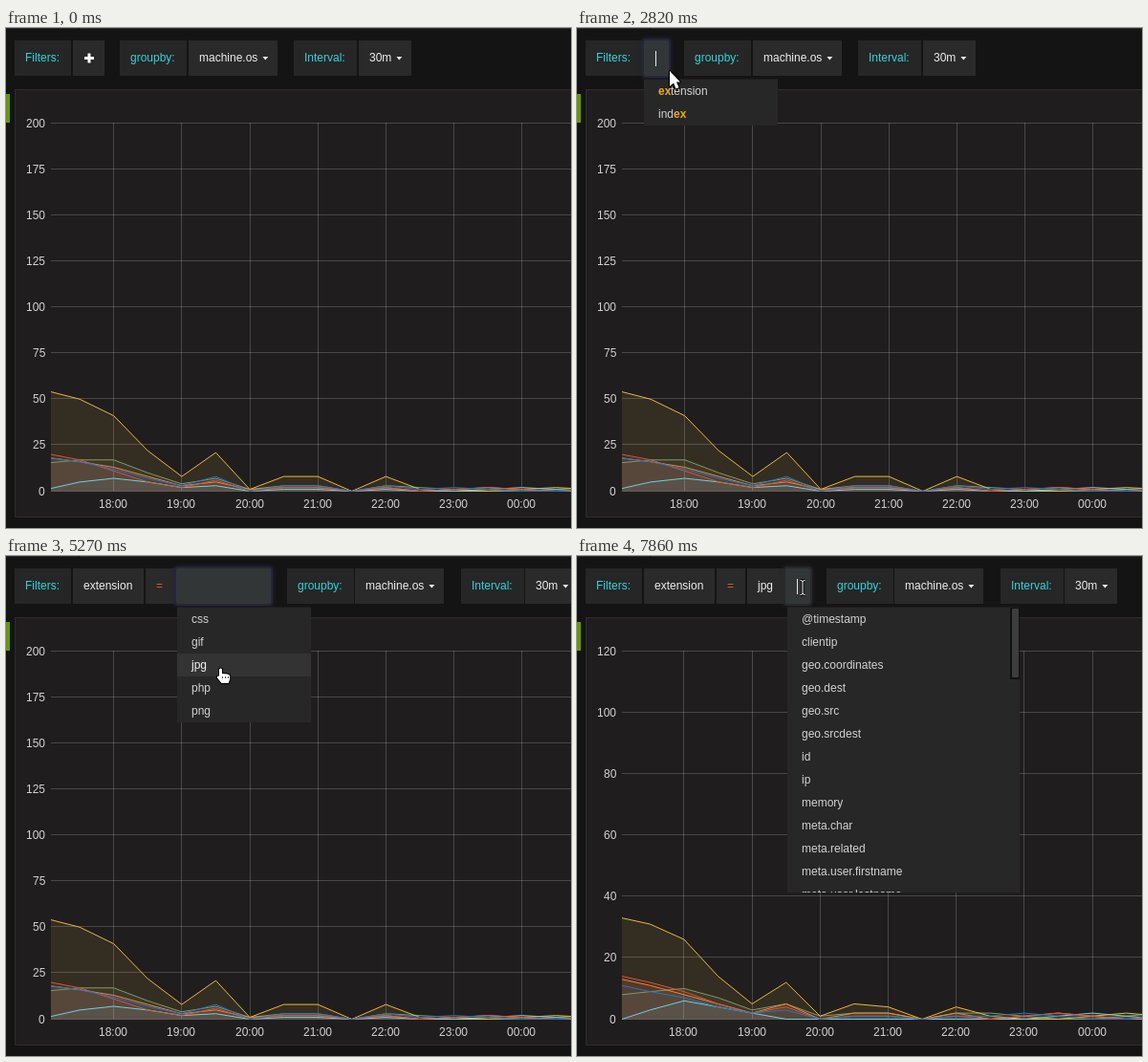
Recreate the animation shown at these times as an HTML page with a canvas. Size 591 by 523 pixels, loop 8 s.

```html
<!DOCTYPE html>
<html lang="en">
<head>
<meta charset="utf-8">
<title>Dashboard filters</title>
<style>
html, body { margin: 0; width: 100%; height: 100%; overflow: hidden; background: #141414; }
canvas { display: block; }
</style>
</head>
<body>
<canvas id="stage" width="591" height="523"></canvas>
<script>
const c = document.getElementById('stage').getContext('2d');
const LOOP = 8000;
const FONT = '12px "Liberation Sans", Arial, sans-serif';
const BOLD = 'bold ' + FONT;
const CYAN = '#31d2dc', PALE = '#eeeeee', SOFT = '#d2d2d2';
const GRID = 'rgba(210,205,205,.24)';
const FLOOR = 484, HEIGHT = 385, STEP = 35.585, POINTS = 17;

const clamp = v => Math.max(0, Math.min(1, v));
const lerp = (a, b, k) => a + (b - a) * k;

function rect(x, y, w, h, color) {
  c.fillStyle = color;
  c.fillRect(x, y, w, h);
}

function round(x, y, w, h, r, color) {
  c.fillStyle = color;
  c.beginPath();
  c.roundRect(x, y, w, h, r);
  c.fill();
}

function measure(s, font = FONT) {
  c.font = font;
  return c.measureText(s).width;
}

// align: 0 left, 0.5 centre, 1 right
function text(s, x, y, color = SOFT, align = 0, font = FONT) {
  const w = measure(s, font);
  c.fillStyle = color;
  c.fillText(s, Math.round(x - w * align), y);
  return w;
}

// ---- Chart ----

const SERIES = [
  { name: 'zt', color: '#7e9a68' },
  { name: 'lum', color: '#eab839' },
  { name: 'orn', color: '#6ed0e0' },
  { name: 'elo', color: '#ef843c' },
  { name: '8', color: '#d9533f' },
  { name: '7', color: '#1f78c1' }
];

// A falling shoulder, a hump at 19:30, echoes of it until 22:00, then a ripple.
function curve([edge, top, fall, hump], s) {
  return Array.from({ length: POINTS }, (_, i) => {
    let v = lerp(edge, top, clamp(i / 2)) / (1 + (i / fall) ** 5);
    if (i === 5) v += hump;
    else if (i > 10) v += 0.8 + 0.8 * Math.sin(s + i * 1.3);
    else if (i > 5) v += 0.55 * hump * Math.cos((i - 7.5) * Math.PI / 3) ** 2;
    return Math.max(0, i ? Math.round(v) : v);
  });
}

// Each shape: edge, top, fall, hump.
const ALL = {
  top: 200, tick: 25, x0: 77.1, cross: '#626060',
  rows: [[15.5, 19, 3, 6], [54, 47, 2.9, 18], [1.5, 8, 3.4, 2],
    [18, 14, 3.2, 4], [20, 14, 2.7, 5], [18, 14, 3, 7]].map(curve)
};
const JPG = {
  top: 120, tick: 20, x0: 76.4, cross: '#9c3a2c',
  rows: [[8, 11, 3.3, 4], [33, 30, 2.95, 10], [0, 6, 3.4, -1],
    [13, 9, 3.2, 4], [14, 11, 2.8, 3], [11, 8, 3, 2]].map(curve)
};

const px = (set, i) => i ? set.x0 + (i - 1) * STEP : 47;
const py = (set, v) => FLOOR - v * HEIGHT / set.top;
const indexAt = (set, x) => Math.max(1, Math.floor((x - set.x0) / STEP) + 1);
const clock = half => String(Math.floor(half / 2) % 24).padStart(2, '0') + (half % 2 ? ':30' : ':00');

function trace(set, row) {
  c.beginPath();
  row.forEach((v, i) => c.lineTo(px(set, i), py(set, v) + 0.5));
}

function drawChart(set) {
  c.globalAlpha = 0.1;
  set.rows.forEach((row, s) => {
    trace(set, row);
    c.lineTo(px(set, POINTS - 1), FLOOR + 0.5);
    c.lineTo(47, FLOOR + 0.5);
    c.fillStyle = SERIES[s].color;
    c.fill();
  });
  c.globalAlpha = 1;
  for (let v = 0; v <= set.top; v += set.tick) {
    const y = Math.floor(py(set, v));
    rect(47, y, 544, 1, GRID);
    text(v, 41, y + 5, SOFT, 1);
  }
  for (let i = 2; i < POINTS - 2; i += 2) {
    const x = Math.floor(px(set, i));
    rect(x, 99, 1, HEIGHT, GRID);
    text(clock(34 + i), x + 0.5, 502, SOFT, 0.5);
  }
  c.lineWidth = 1;
  set.rows.forEach((row, s) => {
    trace(set, row);
    c.strokeStyle = SERIES[s].color;
    c.stroke();
  });
}

function drawHover(set, m) {
  const i = indexAt(set, m.x);
  rect(Math.round(m.x) - 1, 99, 1, HEIGHT, set.cross);
  c.lineWidth = 3;
  c.globalAlpha = 0.55;
  set.rows.forEach((row, s) => {
    c.strokeStyle = SERIES[s].color;
    c.beginPath();
    c.arc(px(set, i), py(set, row[i]), 4.5, 0, 7);
    c.stroke();
  });
  c.globalAlpha = 1;
}

function drawTip(set, m) {
  const i = indexAt(set, m.x);
  const x = Math.round(m.x) + 28, y = Math.round(m.y) + 28;
  round(x, y, 137, 148, 4, '#333333');
  text(`2016-09-20 ${clock(34 + i)}:00`, x + 12, y + 21);
  SERIES.forEach(({ name, color }, s) => {
    const ty = y + 43 + s * 18;
    round(x + 12, ty - 6, 10, 3, 1, color);
    text(name + ':', x + 25, ty);
    text(set.rows[s][i], x + 78, ty, '#e2e2e2', 1, BOLD);
  });
}

function drawPage() {
  rect(0, 0, 591, 523, '#141414');
  rect(0, 0, 76, 1, '#2a2a2a');
  rect(77, 0, 514, 1, '#303030');
  rect(9, 64, 590, 448, '#2d2b2b');
  rect(10, 65, 590, 446, '#1f1d1e');
  rect(0, 69, 4, 30, '#669900');
}

// ---- Toolbar ----

const PAD = 24.7, GAP = 15.3;
const label = s => ({ kind: 'label', s, color: CYAN, back: '#262626' });
const value = (s, end = false) => ({ kind: 'value', s, color: PALE, back: '#2a2a2a', end });
const menu = s => ({ ...value(s, true), kind: 'menu' });
const input = w => ({ kind: 'input', w, end: true });
const PLUS = { kind: 'plus', w: 34.3, back: '#2a2a2a', end: true };
const SMALL = input(27.3), WIDE = input(100.9);
const TAG = [value('extension'), { ...value('='), color: '#c4632f' }];
const TAIL = [label('groupby:'), menu('machine.os'), label('Interval:'), menu('30m')];

const STATES = [
  [0, [PLUS]],
  [1920, [SMALL]],
  [3520, [...TAG, value('select tag value', true)]],
  [4400, [...TAG, WIDE]],
  [6060, [...TAG, value('jpg'), PLUS]],
  [7620, [...TAG, value('jpg'), SMALL]]
];

function drawInput(x, w, age) {
  const blue = clamp((age - 240) / 400);
  const ring = `rgb(${lerp(40, 37, blue)},${lerp(40, 37, blue)},${lerp(42, 60, blue)})`;
  c.save();
  c.shadowColor = ring;
  c.shadowBlur = 5;
  round(x - 2, 11, w + 4, 41, 4, ring);
  c.restore();
  round(x, 13, w, 37, 2, '#333637');
  if (w < 40) rect(x + 12, 24, 1, 16, '#e8e8e8');
}

function drawBar(t) {
  const [start, parts] = STATES.filter(s => t >= s[0]).pop();
  let x = 9.1;
  for (const part of [label('Filters:'), ...parts, ...TAIL]) {
    const left = Math.round(x);
    const full = part.w || measure(part.s) + PAD + (part.kind === 'menu' ? 9 : 0);
    const w = Math.round(full - 1.6);
    if (part.kind === 'input') drawInput(left, w, t - start);
    else rect(left, 13, w, 37, part.back);
    if (part.kind === 'plus') {
      round(left + 12, 30, 10, 3, 0.5, '#ffffff');
      round(left + 15.5, 26.5, 3, 10, 0.5, '#ffffff');
    }
    if (part.s) {
      const end = left + 16 + text(part.s, left + 11, 35, part.color);
      if (part.kind === 'menu') {
        c.beginPath();
        c.moveTo(end, 30);
        c.lineTo(end + 6, 30);
        c.lineTo(end + 3, 33.4);
        c.fill();
      }
    }
    x += full + (part.end ? GAP : 0);
  }
}

// ---- Suggestions ----

const FIELDS = ['@timestamp', 'clientip', 'geo.coordinates', 'geo.dest', 'geo.src', 'geo.srcdest',
  'id', 'ip', 'memory', 'meta.char', 'meta.related', 'meta.user.firstname', 'meta.user.lastname'];
const TYPES = ['css', 'gif', 'jpg', 'php', 'png'];

function drawList(x, w, items, m, mark = '') {
  const h = Math.min(298, items.length * 24);
  c.save();
  c.beginPath();
  c.rect(x, 53, w, h + 1);
  c.clip();
  rect(x, 53, w, h + 1, '#1d1d1d');
  rect(x, 54, w, h, '#272727');
  items.forEach((item, i) => {
    const y = 54 + i * 24;
    const hot = m.x > x && m.x < x + w && m.y >= y && m.y < y + 24;
    if (hot) rect(x, y, w, 24, '#333333');
    const color = hot ? '#f4f4f4' : SOFT;
    const at = mark ? item.indexOf(mark) : 0;
    let tx = x + 15;
    tx += text(item.slice(0, at), tx, y + 16, color);
    tx += text(mark, tx, y + 16, '#eea820', 0, BOLD);
    text(item.slice(at + mark.length), tx, y + 16, color);
  });
  if (h < items.length * 24) {
    rect(x + w - 10, 54, 10, 75, '#111111');
    round(x + w - 8, 55, 7, 72, 1, '#3d3d3d');
  }
  c.restore();
}

function drawLists(t, m) {
  if (t >= 7660) drawList(220, 243, FIELDS, m);
  else if (t >= 6060) return;
  else if (t >= 4440) drawList(179, 140, TYPES, m);
  else if (t >= 3520) return;
  else if (t >= 2900) drawList(70, 140, ['extension'], m, 'ext');
  else if (t >= 2410) drawList(70, 140, ['extension', 'index'], m, 'ex');
  else if (t >= 1960) drawList(70, 243, FIELDS, m);
}

// ---- Pointer ----

// Each move: start, end, x, y.
const MOVES = [
  [420, 780, 228, 108], [780, 1220, 102, 37], [1220, 1340, 82, 27],
  [2660, 2820, 97, 45], [2820, 3100, 128, 80], [3270, 3350, 128, 64], [3870, 4020, 194, 28],
  [4790, 5270, 224, 117], [5270, 5520, 224, 128], [5600, 5720, 199, 111],
  [6090, 6380, 271, 72], [6380, 6460, 243, 66], [6460, 6860, 236, 29]
];

function pointerAt(t) {
  let x = 222, y = 215;
  for (const [from, to, tx, ty] of MOVES) {
    const k = clamp((t - from) / (to - from));
    x = lerp(x, tx, k);
    y = lerp(y, ty, k);
  }
  return { x, y };
}

const HAND = new Path2D('M-1 8.5V2a1.5 1.5 0 0 1 3 0V6l5 .6q3.2.4 3.2 2.4v3l-1.6 4H1.5L-3 10.5q-.8-1.6.8-2z');
const ARROW = new Path2D('M0 0V16L4 12.4L6.5 18.5L9.5 17.3L7 11.4H11Z');
const BEAM = new Path2D('M-2.5-3.5Q0-3.5 0-2V10Q0 11.5-2.5 11.5M2.5-3.5Q0-3.5 0-2M0 10Q0 11.5 2.5 11.5');
const CROSS = new Path2D('M-9-1h6v2h-6zM3-1h6v2h-6zM-1-9h2v6h-2zM-1 3h2v6h-2z');

function shapeAt(t, m) {
  if (t < 1220 && m.y > 64) return CROSS;
  if (t >= 2690 && t < 3080) return ARROW;
  const focus = (t >= 1920 && t < 2690) || (t >= 4400 && t < 6060) || t >= 7620;
  return focus && m.y < 50 ? BEAM : HAND;
}

function drawPointer(t, m) {
  if (t < 420) return;
  const shape = shapeAt(t, m);
  c.save();
  c.translate(Math.round(m.x), Math.round(m.y));
  c.lineJoin = 'round';
  c.strokeStyle = '#000';
  c.lineWidth = shape === BEAM ? 3 : 2;
  c.stroke(shape);
  c.strokeStyle = c.fillStyle = '#fff';
  c.lineWidth = 1;
  if (shape === BEAM) c.stroke(shape);
  else c.fill(shape);
  if (shape === HAND) for (let x = 2; x < 9; x += 3) rect(x, 9, 1, 2, '#555');
  c.restore();
}

function draw(t) {
  const m = pointerAt(t);
  const set = t < 6140 ? ALL : JPG;
  const second = t >= 6180 && t < 6860;
  const over = second ? pointerAt(t + 80) : m;
  const hover = (second || (t >= 420 && t < 1220)) && over.y > 65;
  drawPage();
  drawChart(set);
  if (hover) drawHover(set, over);
  drawBar(t);
  drawLists(t, m);
  if (hover) drawTip(set, over);
  drawPointer(t, m);
}

const begin = performance.now();
function tick() {
  draw((performance.now() - begin) % LOOP);
  requestAnimationFrame(tick);
}
tick();
</script>
</body>
</html>
```
